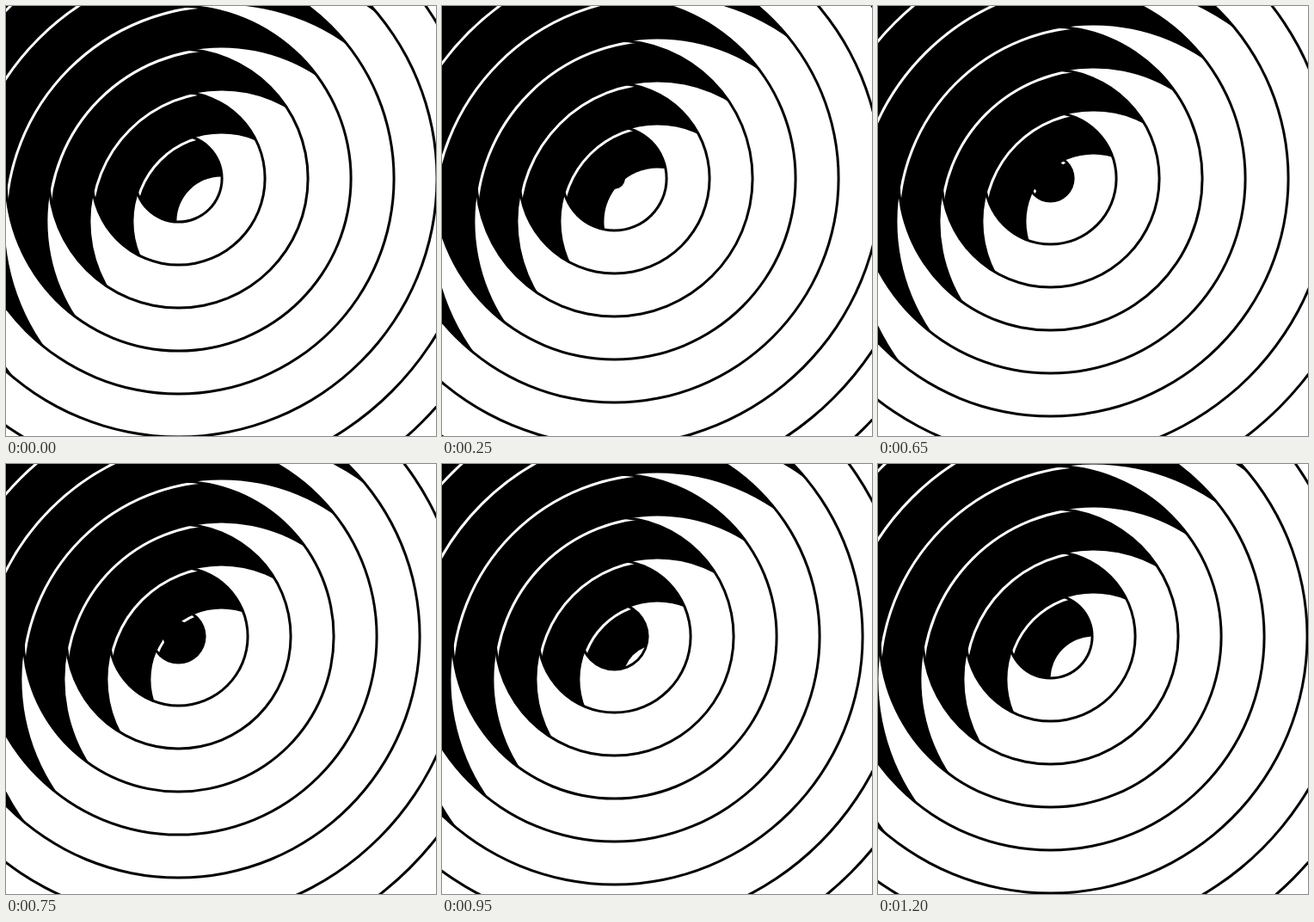
An HTML page with a canvas for the animation above (1250 ms loop, 500 by 500 pixels).

```html
<!DOCTYPE html>
<html lang="en">
<head>
<meta charset="utf-8">
<title>Expanding rings</title>
<style>
  html, body { margin: 0; width: 100%; height: 100%; overflow: hidden; background: #fff; }
  canvas { display: block; }
</style>
</head>
<body>
<canvas id="stage" width="500" height="500"></canvas>
<script>
const ctx = document.getElementById('stage').getContext('2d');
const LOOP = 1250, STEP = 50;
const GAP = 50;         // distance between rings
const HALF = 1.5;       // half the line width
const START = 0.6;      // radius of a newborn ring
const RING = 200.5;     // centre of the rings, x and y
const LIGHT = 250.5;    // centre of the light discs, x and y

function circle(center, radius) {
  ctx.beginPath();
  ctx.arc(center, center, Math.max(0, radius), 0, Math.PI * 2);
}

function disc(center, radius, color) {
  circle(center, radius);
  ctx.fillStyle = color;
  ctx.fill();
}

function layer(radius) {
  disc(RING, radius + HALF, '#000');
  ctx.save();
  circle(RING, radius - HALF);
  ctx.clip();
  // rim of the surrounding light disc
  circle(LIGHT, radius + GAP);
  ctx.strokeStyle = '#fff';
  ctx.lineWidth = HALF * 2;
  ctx.stroke();
  disc(LIGHT, radius + HALF, '#fff');
  ctx.restore();
}

function draw(time) {
  const progress = Math.floor((time % LOOP) / STEP) * STEP / LOOP;
  const shift = START + progress * GAP;
  ctx.fillStyle = '#fff';
  ctx.fillRect(0, 0, 500, 500);
  for (let i = 10; i >= 0; i--) layer(i * GAP + shift);
  // the core shrinks while the newest ring grows
  disc(RING, Math.min(shift + HALF, GAP - shift - HALF), '#000');
}

function tick() {
  draw(performance.now());
  requestAnimationFrame(tick);
}
tick();
</script>
</body>
</html>
```
